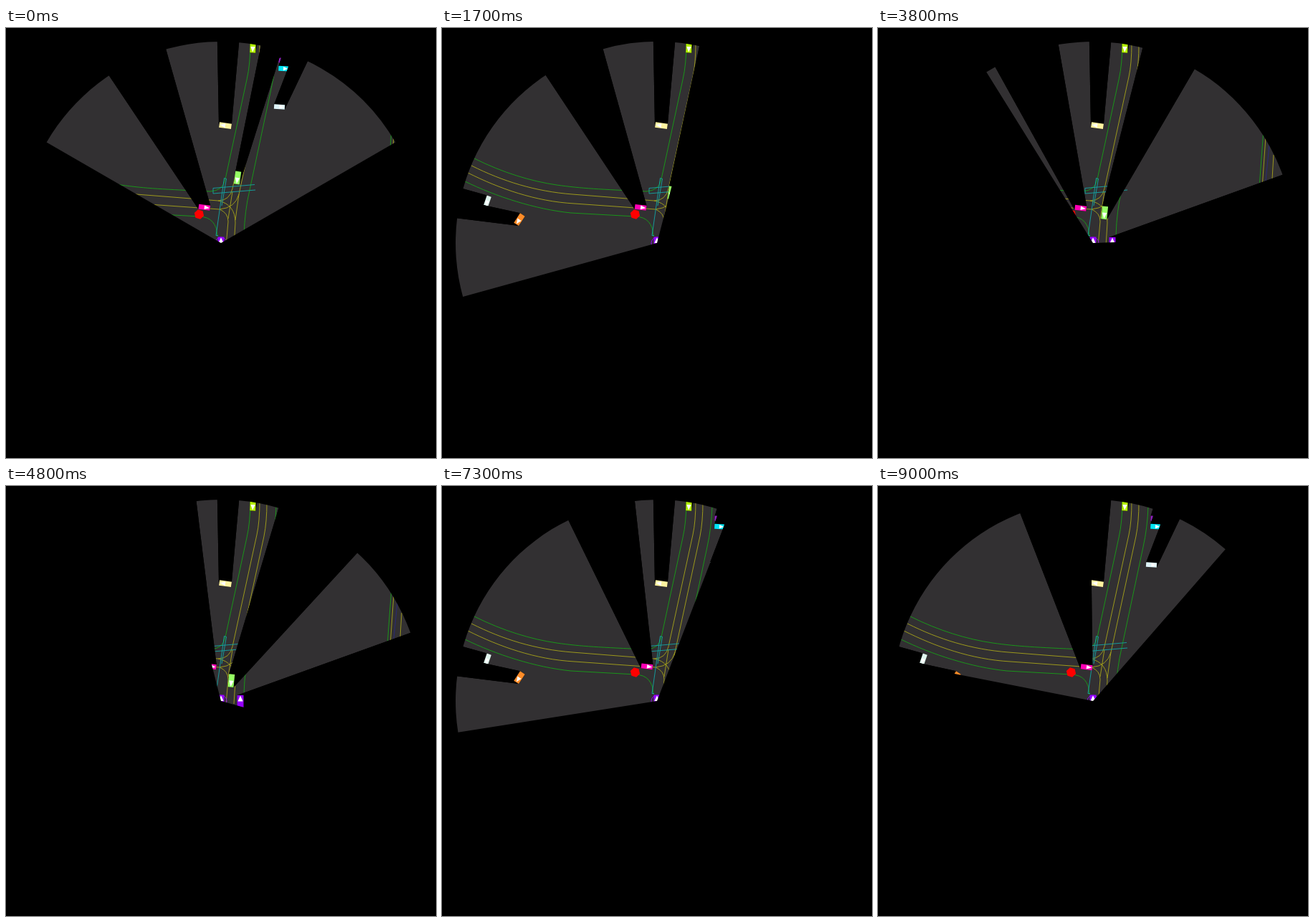
Animation of 600x600 px, one loop 9100 ms. Source, as an HTML page with a canvas:

```html
<!DOCTYPE html>
<html>
<head>
<meta charset="utf-8">
<style>
html, body { margin: 0; height: 100%; background: #000; overflow: hidden; }
canvas { display: block; }
</style>
</head>
<body>
<canvas id="stage" width="600" height="600"></canvas>
<script>
const ctx = document.getElementById('stage').getContext('2d');
const RAD = Math.PI / 180, EYE = 300, RANGE = 281, STEP = 100, STEPS = 91;

const roads = [
  ['#18a018', 'M45 182C85 202 125 214 160 219S220 225 285 228Q303 227 306 211L336 72Q341 50 341 20' +
    'M32 214C75 235 130 253 180 258L270 263Q294 264 295 291' +
    'M377 28Q376 58 370 85L340 226Q333 255 332 290M537.5 148L532.5 216'],
  ['#a8a41a', 'M41 192C85 214 130 228 182 232L296 241Q320 246 320 272L318 304' +
    'M296 241Q312 241 316 224L350 68Q354 50 354 20' +
    'M36 202C80 224 130 242 185 245L298 253Q310 258 310 270L307 304' +
    'M298 253Q320 251 325 232L360 70Q364 50 364 22' +
    'M316 228L310 266M325 232L320 268M541 152L536.5 216M552 177L550 211'],
  ['#2a2a80', 'M546 163L541 213'],
  ['#14a5a5', 'M347 218.5L289 223.5V231L348 226M301 248L307.5 210.5L304.5 209.5L293 289.5H296']
].map(([color, d]) => [color, new Path2D(d)]);

// x, y, heading in degrees, colour, length, width
const parked = [
  [344.5, 26, 92, '#b4f000', 17, 8],
  [306, 136.2, 188, '#fff3a0', 17, 7.5],
  [381.5, 110, 4, '#def3f8', 15, 6.5],
  [387, 56.7, 3, '#00e6f5', 13.5, 7],
  [389, 45.5, 3, '#9020c0', 17, 7],
  [108, 267.2, 123, '#ff8c28', 16, 8],
  [63.5, 241.2, 109, '#e0f5ee', 14, 6.5],
  [327, 300.4, -90, '#9600ff', 17, 9]
];
const ego = [300, 300, -90, '#9600ff', 17, 9];

// Stop-and-go progress of the crossing car: step, distance
const creep = [[0, 0], [17, .3], [30, 3.3], [46, 8.5], [63, 9], [73, 9.2], [90, 14.2]];

function follow(keys, n) {
  const k = Math.max(1, keys.findIndex(key => key[0] >= n));
  const [n0, v0] = keys[k - 1], [n1, v1] = keys[k];
  return v0 + (v1 - v0) * (n - n0) / (n1 - n0);
}

function moving(n) {
  const d = follow(creep, n);
  return [
    [276.8 + d, 250.3 + d * .17, 7, '#ff00b4', 16, 7],
    [323 - .18 * n, 209 + 1.2 * n + .0022 * n * n, 98 - .05 * n, '#96ff64', 18, 8]
  ];
}

function poly(points, color) {
  ctx.beginPath();
  points.forEach(p => ctx.lineTo(...p));
  ctx.fillStyle = color;
  ctx.fill();
}

function place([x, y, heading], points) {
  const c = Math.cos(heading * RAD), s = Math.sin(heading * RAD);
  return points.map(([u, v]) => [x + u * c - v * s, y + u * s + v * c]);
}

function corners(car) {
  const l = car[4] / 2, w = car[5] / 2;
  return place(car, [[l, -w], [l, w], [-l, w], [-l, -w]]);
}

function drawCar(car) {
  const l = car[4] * .46, w = car[5] * .4;
  poly(corners(car), car[3]);
  poly(place(car, [[l, 0], [0, w], [0, -w]]), '#fff');
}

function drawShadow(car) {
  const far = p => p.map(v => EYE + (v - EYE) * 30);
  const box = corners(car);
  box.forEach((a, i) => {
    const b = box[(i + 1) % 4];
    poly([a, b, far(b), far(a)], '#000');
  });
}

const distance = car => Math.hypot(car[0] - EYE, car[1] - EYE);

function draw(n) {
  ctx.globalCompositeOperation = 'source-over';
  ctx.fillStyle = '#323032';
  ctx.fillRect(0, 0, 600, 600);

  ctx.lineWidth = .9;
  for (const [color, path] of roads) {
    ctx.strokeStyle = color;
    ctx.stroke(path);
  }
  const hexagon = [0, 1, 2, 3, 4, 5].map(i => [6.9 * Math.cos(i * 60 * RAD), 6.9 * Math.sin(i * 60 * RAD)]);
  poly(place([269.5, 260, 17], hexagon), '#f00');

  // Far to near, so that each shadow hides whatever lies behind its car
  const cars = [...parked, ...moving(n)].sort((a, b) => distance(b) - distance(a));
  for (const car of cars) {
    drawShadow(car);
    drawCar(car);
  }
  drawCar(ego);
  ctx.beginPath();
  ctx.arc(EYE, EYE, 8, 0, 7);
  ctx.strokeStyle = ego[3];
  ctx.stroke();

  // Keep only the cone of view, which swings by 0.8 radians to each side
  const look = -Math.PI / 2 - .8 * Math.sin(n / 10), half = Math.PI / 3;
  ctx.globalCompositeOperation = 'destination-in';
  ctx.beginPath();
  ctx.moveTo(EYE, EYE);
  ctx.arc(EYE, EYE, RANGE, look - half, look + half);
  ctx.fill();
}

function tick() {
  draw(Math.floor(performance.now() / STEP) % STEPS);
  requestAnimationFrame(tick);
}
tick();
</script>
</body>
</html>
```
